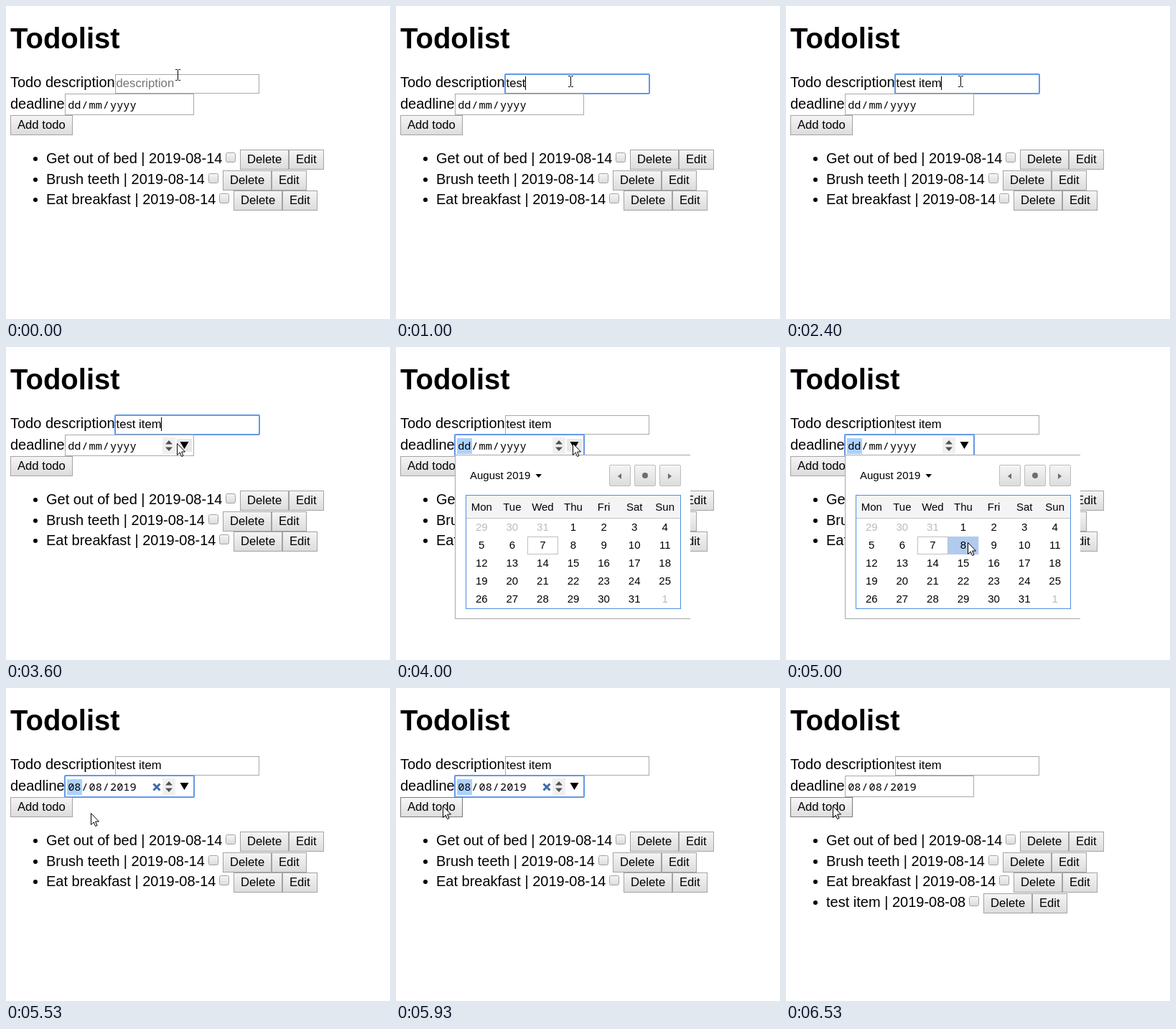
These frames come from a looping animation (535 px wide and 436 px high, 8000 ms). An HTML page:

```html
<!DOCTYPE html>
<html lang="en">
<head>
<meta charset="utf-8">
<title>Todolist</title>
<style>
  html, body { margin: 0; width: 100%; height: 100%; overflow: hidden; background: #fff; }
  svg { display: block; }
  text { font: 20px "Liberation Sans", Arial, sans-serif; white-space: pre; }
  .title { font-size: 40px; font-weight: bold; }
  .ui { font-size: 16.67px; }
  .mono { font: 15.28px "Noto Sans Mono", monospace; }
  .cal { font-size: 15px; }
  .mid { text-anchor: middle; }
  .dim { fill: #bbb; }
  .box { fill: #fff; stroke: #a9a9a9; }
  .btn { fill: url(#face); stroke: #a3a3a3; }
  .btn.hover { fill: url(#lit); stroke: #7b7b7b; }
  .btn.down { fill: url(#pressed); stroke: #7b7b7b; }
  .ring { fill: none; stroke: #6498e6; stroke-width: 2; }
</style>
</head>
<body>
<svg width="535" height="436" viewBox="0 0 535 436">
  <defs>
    <linearGradient id="face" x2="0" y2="1"><stop stop-color="#f5f5f5"/><stop offset="1" stop-color="#dcdcdc"/></linearGradient>
    <linearGradient id="lit" x2="0" y2="1"><stop stop-color="#f8f8f8"/><stop offset="1" stop-color="#dedede"/></linearGradient>
    <linearGradient id="pressed" x2="0" y2="1"><stop stop-color="#d8d8d8"/><stop offset="1" stop-color="#ececec"/></linearGradient>
  </defs>

  <text class="title" x="6" y="59">Todolist</text>
  <text x="6" y="113">Todo description</text>
  <text x="6" y="143">deadline</text>

  <rect class="box" x="152.5" y="95.5" width="200" height="26"/>
  <rect class="ring" id="descRing" x="152" y="95" width="201" height="27" rx="1"/>
  <text class="ui" id="hint" x="153.6" y="113" fill="#757575">description</text>
  <text class="ui" id="typed" x="153.6" y="113"></text>
  <rect id="caret" y="98" width="1" height="19"/>

  <rect class="box" x="82.5" y="122.5" width="179" height="29"/>
  <rect class="ring" id="dateRing" x="82" y="122" width="180" height="30" rx="1"/>
  <rect id="field" x="85" y="127" width="21" height="22" fill="#acd1ff"/>
  <g id="date"></g>
  <g id="tools">
    <rect x="218" y="126" width="18" height="23" fill="#f0f0f0"/>
    <path d="M222 135.5l5-5.5 5 5.5zM222 139.5l5 5.5 5-5.5z" fill="#505050"/>
    <rect id="dropHover" x="238" y="128" width="21" height="18" fill="#e8e8e8"/>
    <path d="M242.5 132h12l-6 10z"/>
    <path id="clear" d="M205.5 133.5l9 9m0-9l-9 9" stroke="#3f69ad" stroke-width="3"/>
  </g>

  <g id="page"></g>

  <g id="popup">
    <path d="M82 150H410V379H82z" fill="#fff"/>
    <path d="M410 150.5H82.5V378.5H410" fill="none" stroke="#a6a6a6"/>
    <text class="cal" x="103" y="184">August 2019</text>
    <path d="M194.5 177h8.5l-4.25 5z"/>
    <g id="nav"></g>
    <path d="M314 176v8l-5-4zM379 176v8l5-4z" fill="#6e6e6e"/>
    <circle cx="347" cy="179" r="4" fill="#6e6e6e"/>
    <rect x="97.5" y="206.5" width="299" height="158" fill="#fff"/>
    <path d="M98 207h298v31H98z" fill="#f4f4f4"/>
    <path d="M98 238.5h298" stroke="#c4c4c4"/>
    <rect id="cell" width="42.57" height="25" fill="#b0cbef"/>
    <g id="days"></g>
    <rect x="183.5" y="264.5" width="42" height="24" fill="none" stroke="#bfbfbf"/>
    <rect x="97.5" y="206.5" width="299" height="158" fill="none" stroke="#4d90e0"/>
  </g>

  <path id="beam" d="M-3.5 -7.5h2.5l1 1 1 -1h2.5M0 -6.5v13M-3.5 7.5h2.5l1 -1 1 1h2.5" fill="none" stroke="#000"/>
  <path id="arrow" d="M.5 .5V16.5L4.2 13 6.6 18.5 9 17.5 6.6 12H11.5z" fill="#fff" stroke="#000"/>
</svg>
<script>
const $ = id => document.getElementById(id);
const PITCH = 298 / 7;
const TICK = 1000 / 15, LOOP = 8000;

function add(parent, tag, attrs, label) {
  const node = document.createElementNS('http://www.w3.org/2000/svg', tag);
  for (const key in attrs) node.setAttribute(key, attrs[key]);
  if (label !== undefined) node.textContent = label;
  return parent.appendChild(node);
}

function button(parent, x, y, width, label) {
  const face = add(parent, 'rect', { class: 'btn', x: x + .5, y: y + .5, width: width - 1, height: 27 });
  add(parent, 'text', { class: 'ui', x: x + 10, y: y + 19 }, label);
  return face;
}

function todo(y, label, x) {
  const row = add($('page'), 'g', {});
  add(row, 'circle', { cx: 41, cy: y - 6, r: 3 });
  add(row, 'text', { x: 56, y }, label);
  add(row, 'rect', { class: 'btn', x: x + .5, y: y - 14.5, width: 13, height: 13, rx: 2 });
  button(row, x + 20, y - 19, 68, 'Delete');
  button(row, x + 88, y - 19, 49, 'Edit');
  return row;
}

const addButton = button($('page'), 6, 152, 87, 'Add todo');
todo(219, 'Get out of bed | 2019-08-14', 306);
todo(248, 'Brush teeth | 2019-08-14', 282);
todo(276, 'Eat breakfast | 2019-08-14', 297);
const newRow = todo(305, 'test item | 2019-08-08', 255);

const dateParts = [86.2, 105.3, 115.6, 134.8, 145].map(x => add($('date'), 'text', { class: 'mono', x, y: 143 }));

for (const x of [297, 332, 367])
  add($('nav'), 'rect', { x: x + .5, y: 164.5, width: 29, height: 29, rx: 1.5, fill: 'url(#face)', stroke: '#bdbdbd' });

const center = col => 98 + PITCH * (col + .5);
['Mon', 'Tue', 'Wed', 'Thu', 'Fri', 'Sat', 'Sun'].forEach((name, col) =>
  add($('days'), 'text', { class: 'cal mid', x: center(col), y: 228 }, name));
for (let i = 0; i < 35; i++) {
  const day = i - 2, other = day < 1 || day > 31;
  add($('days'), 'text', {
    class: 'cal mid' + (other ? ' dim' : ''), x: center(i % 7), y: 256 + 25 * Math.floor(i / 7)
  }, (day + 30) % 31 + 1);
}

// Ticks at which each character of the entry is typed
const entry = 'test item', keyTicks = [9, 11, 14, 15, 25, 29, 31, 34, 36];

// Pointer path: tick, x, y
const path = [
  [0, 239.5, 96], [1, 241, 99], [2, 243.5, 105], [44, 243.5, 105], [47, 190, 116], [49, 167, 132],
  [51, 183, 143], [54, 238, 134], [56, 246, 134], [61, 246, 134], [62, 251, 152], [63, 264, 196],
  [64, 271, 228], [66, 271, 228], [69, 262, 246], [72, 253, 272], [76, 253, 272], [77, 245, 259],
  [78, 245, 259], [79, 232, 250], [81, 172, 208], [83, 118, 174], [86, 82, 165], [89, 64.5, 163.5], [120, 64.5, 163.5]
];

function pointer(n) {
  const i = path.findIndex(p => p[0] > n);
  const [a, x, y] = path[i - 1], [b, x2, y2] = path[i];
  const k = (n - a) / (b - a);
  return [x + (x2 - x) * k, y + (y2 - y) * k];
}

const between = (n, from, to) => n >= from && n < to;
const show = (id, on) => $(id).style.display = on ? '' : 'none';

function draw(n) {
  const [x, y] = pointer(n);
  const descFocus = between(n, 4, 57), dateFocus = between(n, 57, 96);
  const overDate = between(x, 82, 262) && between(y, 122, 152);

  const count = keyTicks.filter(t => t <= n).length;
  $('typed').textContent = entry.slice(0, count);
  show('hint', !count);
  show('descRing', descFocus);
  show('caret', descFocus && !between(n, 23, 25) && !between(n, 44, 51));
  $('caret').setAttribute('x', Math.floor(153.3 + (count ? $('typed').getComputedTextLength() : 0)));

  const filled = n >= 76;
  const parts = (filled ? '08 / 08 / 2019' : 'dd / mm / yyyy').split(' ');
  dateParts.forEach((node, i) => node.textContent = parts[i]);
  show('dateRing', dateFocus);
  show('field', dateFocus);
  show('tools', dateFocus || overDate);
  show('dropHover', overDate && x >= 238);
  show('clear', filled);

  show('popup', between(n, 57, 77));
  $('popup').setAttribute('opacity', n === 57 || n === 76 ? .5 : 1);
  const row = Math.floor((y - 239) / 25);
  show('cell', row >= 0);
  $('cell').setAttribute('x', 98 + PITCH * Math.floor((x - 98) / PITCH));
  $('cell').setAttribute('y', 239 + 25 * row);

  const overAdd = between(x, 6, 93) && between(y, 152, 180);
  addButton.setAttribute('class', 'btn' + (between(n, 96, 98) ? ' down' : overAdd ? ' hover' : ''));
  newRow.style.display = n >= 98 ? '' : 'none';

  const beam = y < 122;
  show('beam', beam);
  show('arrow', !beam);
  const at = beam ? [Math.floor(x) + .5, Math.round(y)] : [Math.round(x), Math.round(y)];
  $(beam ? 'beam' : 'arrow').setAttribute('transform', `translate(${at})`);
}

const start = performance.now();
let last = -1;
function frame() {
  const t = (performance.now() - start) % LOOP;
  const n = Math.floor((t + 5) / TICK) % 120;
  if (n !== last) draw(last = n);
  requestAnimationFrame(frame);
}
frame();
</script>
</body>
</html>
```
